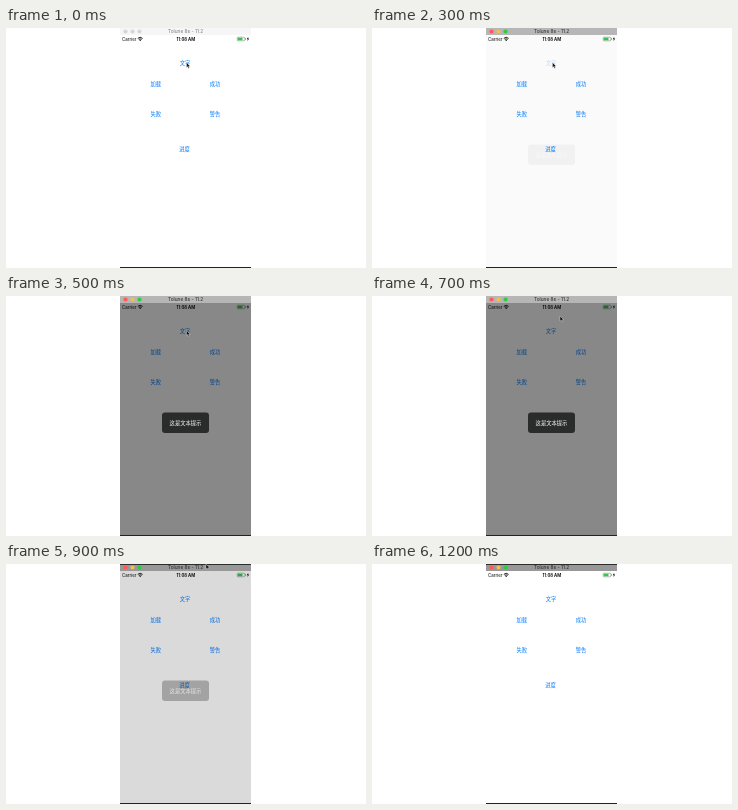
An HTML page for the animation above (1.5 s loop, 360 by 240 pixels).

```html
<!DOCTYPE html>
<html lang="zh">
<head>
<meta charset="utf-8">
<title>HUD</title>
<style>
  html, body { margin: 0; width: 100%; height: 100%; overflow: hidden; background: #fff; }
  svg { display: block; width: 360px; height: 240px; }
  text { font-family: Inter, "Liberation Sans", sans-serif; }
  .zh { font: 5.3px "Noto Sans CJK SC", "Noto Sans CJK", sans-serif; text-anchor: middle; }
  .button { fill: #007aff; }
  .mid { text-anchor: middle; }
</style>
</head>
<body>
<svg viewBox="0 0 360 240">
  <g id="screen">
    <text x="116" y="12.6" font-size="4.4">Carrier</text>
    <g fill="none" stroke="#000" stroke-width=".9">
      <path d="M131.8 10.4Q134.2 8.2 136.6 10.4M132.8 11.5Q134.2 10.2 135.6 11.5"/>
    </g>
    <circle cx="134.2" cy="12.4" r=".6"/>
    <text class="mid" x="179.8" y="12.6" font-size="4.3" font-weight="600">11:08 AM</text>
    <rect x="231.2" y="9.2" width="7.6" height="3.6" rx=".8" fill="#fff" stroke="#555" stroke-width=".4"/>
    <rect x="231.7" y="9.7" width="4.8" height="2.6" rx=".4" fill="#35c64b"/>
    <rect x="239.2" y="10.3" width=".6" height="1.4" fill="#555"/>
    <path d="M242.3 8.8L240.8 11.3H241.9L241.5 13.2L243.1 10.6H242Z"/>
  </g>
  <rect id="dim" x="114" y="7" width="131" height="232" opacity="0"/>
  <g id="hud" opacity="0">
    <rect x="156" y="116.5" width="47" height="20.5" rx="3" fill="#2a2b2b"/>
    <text class="zh" x="179.5" y="129" fill="#fff">这是文本提示</text>
  </g>
  <rect id="bar" x="114" y="0" width="131" height="7"/>
  <rect id="edge" x="114" y="0" width="131" height=".9" fill="#222"/>
  <g id="lights"></g>
  <text id="title" class="mid" x="179.6" y="5.3" font-size="4.8">Tolune 8s - 11.2</text>
  <rect x="114" y="239" width="131" height="1" fill="#222"/>
  <path id="cursor" d="M0 0V5.2L1.2 4.1L2 6L2.9 5.6L2.1 3.8H3.7Z" fill="#111" stroke="#fff" stroke-width=".35"/>
</svg>
<script>
const $ = id => document.getElementById(id);
const LOOP = 1500, STEP = 100;
const LIGHTS = ['#fc5b57', '#fdbc40', '#34c84a'];
const BUTTONS = [
  ['文字', 179, 35], ['加载', 149.7, 56], ['成功', 209, 56],
  ['失败', 149.7, 86], ['警告', 209, 86], ['进度', 178.6, 120.5]
];
// HUD opacity for each 100 ms step
const FADE = [0, 0, 0, .04, .74, 1, 1, 1, .97, .31, .03, 0, 0];
// Pointer positions by step; null hides it
const POINTER = [[0, 180.5, 34.5], [7, 188, 20], [8, null], [9, 200, 0], [10, null]];
// Title bar fill by step
const BAR = [[0, '#f6f6f6'], [1, '#b6b6b6'], [8, '#a8a8ac'], [9, '#989898']];

const add = (parent, tag, attrs, text = '') => {
  const el = document.createElementNS('http://www.w3.org/2000/svg', tag);
  for (const k in attrs) el.setAttribute(k, attrs[k]);
  el.textContent = text;
  return parent.appendChild(el);
};
const set = (id, key, value) => $(id).setAttribute(key, value);
const latest = (table, step) => table.filter(row => row[0] <= step).pop();

const buttons = BUTTONS.map(([label, x, y]) =>
  add($('screen'), 'text', { class: 'zh button', x, y: y + 2 }, label));
const lights = LIGHTS.map((_, i) =>
  add($('lights'), 'circle', { cx: 119.5 + 7 * i, cy: 3.5, r: 2.1 }));

function draw(time) {
  const step = Math.min(12, Math.floor(time % LOOP / STEP));
  const active = step > 0;
  const pressed = step === 2 || step === 3;
  const [, x, y] = latest(POINTER, step);

  set('dim', 'opacity', FADE[step] * .465);
  set('hud', 'opacity', FADE[step]);
  set('bar', 'fill', latest(BAR, step)[1]);
  set('edge', 'opacity', step > 7 ? 1 : 0);
  set('title', 'fill', active ? '#222' : '#777');
  lights.forEach((el, i) => el.setAttribute('fill', active ? LIGHTS[i] : '#d6d6d6'));
  buttons[0].setAttribute('opacity', pressed ? .25 : 1);
  set('cursor', 'opacity', x === null ? 0 : 1);
  if (x !== null) set('cursor', 'transform', `translate(${x} ${y})`);
}

const start = performance.now();
function tick() {
  draw(performance.now() - start);
  requestAnimationFrame(tick);
}
tick();
</script>
</body>
</html>
```
